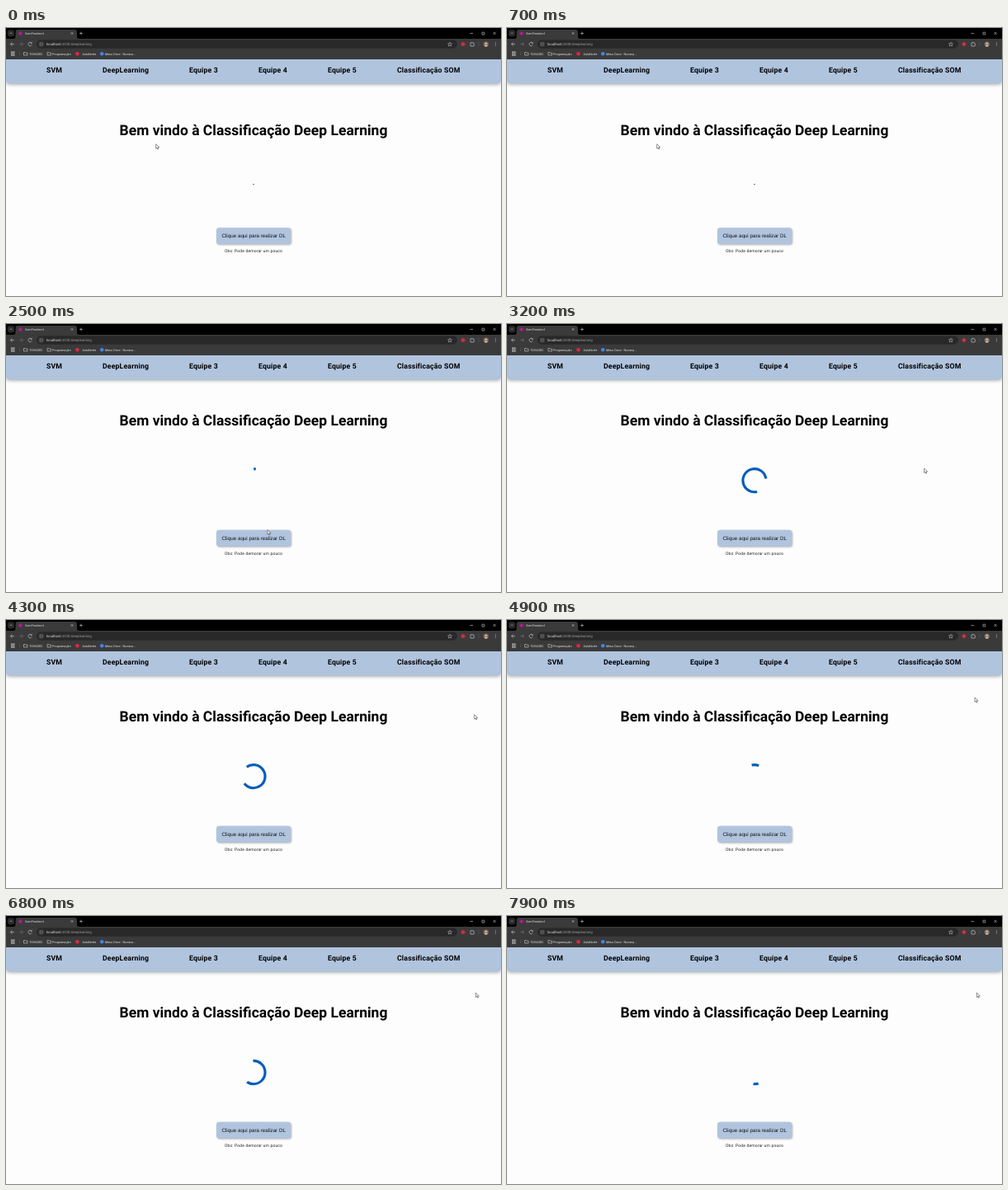
Write an HTML page that moves like this. It is 600 by 325 pixels and loops after 8000 ms.

```html
<!DOCTYPE html>
<html lang="pt-BR">
<head>
<meta charset="utf-8">
<title>SomFrontend</title>
<style>
  html, body { margin: 0; height: 100%; overflow: hidden; background: #fdfdfd; }
  svg { display: block; width: 100vw; height: 100vh; font-family: Roboto, sans-serif; text-rendering: geometricPrecision; }
  .chrome { font-size: 3.75px; fill: #e3e3e3; }
  .icon { fill: none; stroke: #d0d0d0; stroke-width: .6; }
  .nav { font-size: 8.75px; font-weight: 700; letter-spacing: .13px; }
  .title { font-size: 17.5px; font-weight: 700; text-anchor: middle; }
  .button { filter: drop-shadow(1px 1.3px 1.2px rgba(0, 0, 0, .32)); }
  .label { font: 6.25px "Liberation Sans", Arial, sans-serif; text-anchor: middle; fill: #111; }
  .note { font-size: 5px; letter-spacing: .156px; text-anchor: middle; fill: #222; }
  .bar { filter: drop-shadow(0 1.5px 2px rgba(0, 0, 0, .35)); }
</style>
</head>
<body>
<svg viewBox="0 0 600 325">
  <path class="bar" d="M0 37H600V62.500Q600 67.500 595 67.500H5Q0 67.500 0 62.500Z" fill="#b0c4de"/>
  <g class="nav" id="nav"></g>

  <g class="chrome">
    <path d="M0 0H600V38H0Z" fill="#000"/>
    <path d="M0 13H600V38H0Z" fill="#3a3a3a"/>
    <path d="M9 13Q11.500 13 11.500 10.500V5Q11.500 2 14.500 2H83Q86 2 86 5V10.500Q86 13 88.500 13Z" fill="#3a3a3a"/>
    <rect x="2" y="2.300" width="8" height="8" rx="2.500" fill="#2b2b2b"/>
    <rect x="37" y="14.500" width="510" height="10.200" rx="5.100" fill="#282828"/>
    <circle cx="42.700" cy="19.600" r="3.600" fill="#3a3a3a"/>

    <circle cx="17.500" cy="6.500" r="2.300" fill="#a91e8c"/>
    <text x="23" y="7.800">SomFrontend</text>
    <text x="49" y="21.200" font-size="4.300">localhost<tspan fill="#9a9a9a">:4200/deeplearning</tspan></text>
    <text x="28" y="32.500">TOVADEC</text>
    <text x="56" y="32.500">Programação</text>
    <text x="92.500" y="32.500">AulaNorte</text>
    <text x="120" y="32.500">Meus Docs - Nuvexa...</text>

    <g class="icon">
      <path d="M4.800 5.600L6 6.900L7.200 5.600M78.800 5.200L81.400 7.800M81.400 5.200L78.800 7.800M91 4.600V8.400M89.100 6.500H92.900"/>
      <path d="M562.500 6.500H566M577 5.200H579.800V8H577ZM590.500 4.800L593.700 8M593.700 4.800L590.500 8"/>
      <path d="M10 19.600H5.500M7.500 17.500L5.400 19.600L7.500 21.700M31 18.300A2.200 2.200 0 1 0 31.200 20.400M31.200 16.900V18.500H29.600"/>
      <path d="M16 19.600H20.500M18.500 17.500L20.600 19.600L18.500 21.700" stroke="#777"/>
      <path d="M40.900 18.500H42M43.400 18.500H44.600M40.900 20.700H42.200M43.400 20.700H44.600"/>
      <path d="M538 17.200L538.700 18.900L540.500 19L539.100 20.200L539.600 22L538 21L536.400 22L536.900 20.200L535.500 19L537.300 18.900Z" stroke-width=".5"/>
      <path d="M563 18H564.200Q564.800 16.200 565.400 18H567V19.600Q568.600 20 567 20.800V22H563Z"/>
      <path d="M573 17V22.500M16.500 28.500V33.500" stroke="#666" stroke-width=".4"/>
      <path id="folder" d="M21.500 29.500H23.200L23.800 30.200H26V33H21.500Z"/>
      <use href="#folder" x="28.500"/>
      <path d="M6 29.200H10.600M6 31.200H10.600M6 33.200H10.600" stroke-width="1.300" stroke-dasharray="1.300 .35"/>
    </g>
    <circle cx="554" cy="19.600" r="2.400" fill="#d32f3c"/>
    <circle cx="581.800" cy="19.600" r="3" fill="#8d7160"/>
    <path d="M579.700 21.700Q581.800 19.700 583.900 21.700Q581.800 23.400 579.700 21.700Z" fill="#d9c5b3"/>
    <circle cx="581.800" cy="18.900" r="1.100" fill="#d9c5b3"/>
    <path d="M593.500 17.600V21.700" stroke="#d0d0d0" stroke-width=".8" stroke-dasharray=".8 .85"/>
    <circle cx="86.500" cy="31.200" r="2.300" fill="#e0283c"/>
    <circle cx="116.200" cy="31.200" r="2.200" fill="#4385f0"/>
  </g>

  <text class="title" id="title" x="300">Bem vindo à Classificação Deep Learning</text>
  <path id="dot" d="M299.200 189.600H300.800" stroke="#555"/>
  <circle id="spinner" cx="300" cy="189.700" r="14.060" pathLength="360" fill="none" stroke="#005cbb" stroke-width="3.125"/>
  <g id="action">
    <rect class="button" x="255" y="242.300" width="90" height="19.600" rx="3.200" fill="#b0c4de"/>
    <text class="label" x="300.200" y="254.400">Clique aqui para realizar DL</text>
    <text class="note" x="300" y="272.200">Obs: Pode demorar um pouco</text>
  </g>
  <path id="cursor" d="M0 0V5.500L1.300 4.300L2.200 6.300L3.100 5.900L2.200 4H4Z" fill="#fff" stroke="#222" stroke-width=".5"/>
</svg>
<script>
const LOOP = 8000, LOAD_START = 2475, ARC_HALF_CYCLE = 666.5, SPIN_PERIOD = 1568.235;
const byId = id => document.getElementById(id);
const title = byId('title'), dot = byId('dot'), spinner = byId('spinner');
const action = byId('action'), cursor = byId('cursor');

const links = [['SVM', 49], ['DeepLearning', 117], ['Equipe 3', 222], ['Equipe 4', 306],
  ['Equipe 5', 390], ['Classificação SOM', 474]];
byId('nav').innerHTML = links.map(([name, x]) => `<text x="${x}" y="54.200">${name}</text>`).join('');

// time, x, y
const cursorPath = [
  [0, 181.700, 140.700], [850, 181.700, 140.700], [1000, 212, 186], [1150, 212, 186],
  [1600, 327.800, 222.700], [2000, 317, 247], [2950, 317, 252], [3200, 505.700, 175],
  [3500, 528, 158], [3850, 528, 158], [4300, 567.700, 114.700], [4700, 567, 94],
  [5600, 567, 93.500], [5900, 569.300, 93], [LOOP, 569.300, 93]
];

// cubic-bezier(.4, 0, .2, 1)
function ease(x) {
  let low = 0, high = 1, s;
  for (let i = 0; i < 20; i++) {
    s = (low + high) / 2;
    const at = 1.2 * s * (1 - s) ** 2 + 0.6 * s * s * (1 - s) + s ** 3;
    if (at < x) low = s; else high = s;
  }
  return s * s * (3 - 2 * s);
}

function cursorAt(t) {
  const i = cursorPath.findIndex(p => p[0] > t);
  const [t0, x0, y0] = cursorPath[i - 1], [t1, x1, y1] = cursorPath[i];
  const k = (t - t0) / (t1 - t0), s = k * k * (3 - 2 * k);
  return [x0 + (x1 - x0) * s, y0 + (y1 - y0) * s];
}

function drawSpinner(elapsed) {
  const step = Math.floor(elapsed / ARC_HALF_CYCLE);
  const eased = ease(elapsed / ARC_HALF_CYCLE - step);
  const half = 5 + 135 * (step % 2 ? 1 - eased : eased);
  const middle = -90 + 135 * (step + eased) + 360 * elapsed / SPIN_PERIOD;
  spinner.setAttribute('stroke-dasharray', `${2 * half} 360`);
  spinner.setAttribute('transform', `rotate(${middle - half} 300 189.700)`);
}

function draw(now) {
  const t = now % LOOP, loading = t >= LOAD_START, shift = loading ? 7.5 : 0;
  title.setAttribute('y', 130 - shift);
  action.setAttribute('transform', `translate(0 ${shift})`);
  dot.style.display = loading ? 'none' : '';
  spinner.style.display = loading ? '' : 'none';
  if (loading) drawSpinner(t - LOAD_START);
  cursor.setAttribute('transform', `translate(${cursorAt(t)})`);
}

const start = performance.now();
function tick() {
  draw(performance.now() - start);
  requestAnimationFrame(tick);
}
tick();
</script>
</body>
</html>
```
